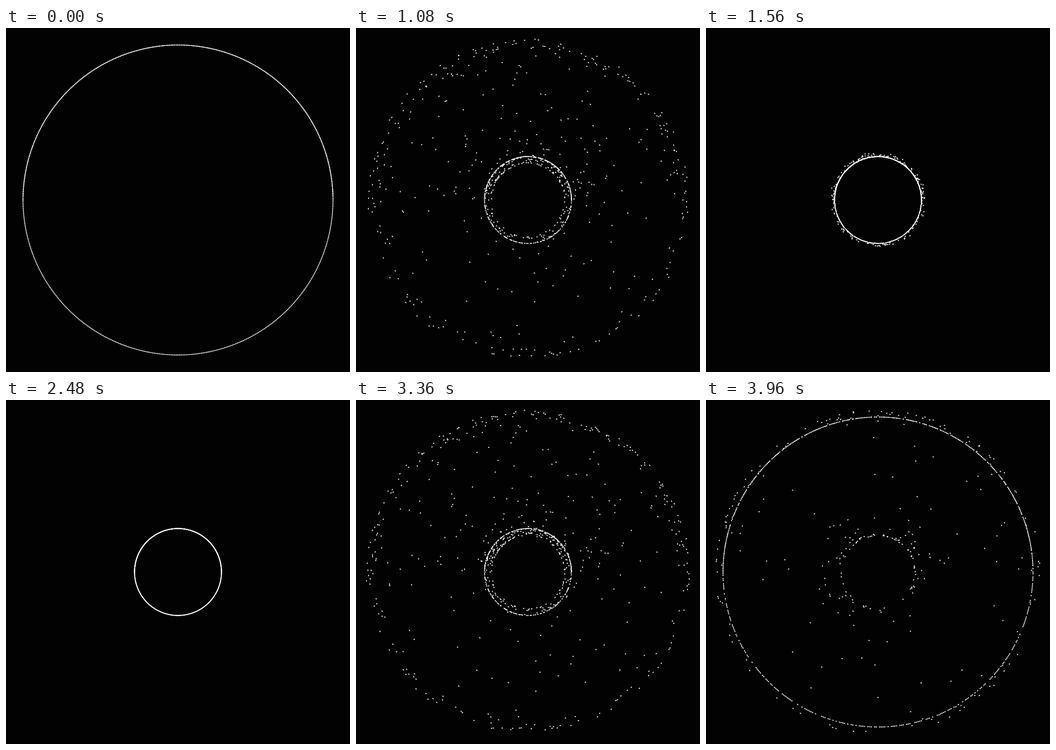
These frames come from a looping animation (748x748 px, 4 s). An HTML page with a canvas:

```html
<!DOCTYPE html>
<html lang="en">
<head>
<meta charset="utf-8">
<title>Dotted ring</title>
<style>
  html, body { margin: 0; height: 100%; overflow: hidden; background: #020202; }
  canvas { display: block; }
</style>
</head>
<body>
<canvas id="stage" width="748" height="748"></canvas>
<script>
const ctx = document.getElementById('stage').getContext('2d');
const CENTER = 374, INNER = 94.5, OUTER = 337;
const LOOP = 4000, STEP = 40, MIDDLE = 2200, SETTLED = 1800;
const SLOTS = 576, COUNT = SLOTS * 1.5;

let seed = 20717;
function random() {
  seed = (seed * 1664525 + 1013904223) % 4294967296;
  return seed / 4294967296;
}

const clamp = x => Math.max(0, Math.min(1, x));

// One and a half laps centred on the bottom, so the upper half holds two dots per slot.
const dots = Array.from({ length: COUNT }, (_, i) => ({
  angle: Math.PI + (i - COUNT / 2) / SLOTS * 2 * Math.PI,
  lead: random() * 2 - 1,
  release: 920 * (1 + 0.1 * random())
}));

// Ease that dips below 0 and rises above 1 before settling.
function backInOut(s) {
  const c = 1.97;
  const pull = x => x * x * ((c + 1) * x - c) / 2;
  return s < 0.5 ? pull(2 * s) : 1 - pull(2 - 2 * s);
}

function radius(dot, age) {
  if (age >= SETTLED) return OUTER;
  const late = clamp((age - 1120) / 640) ** 2;
  const mean = 0.00075 * (age - 707) + 0.72 * late;
  const spread = 0.65 + 0.77 * late;
  const reach = 1 - Math.exp(-Math.pow(age / dot.release, 8.1));
  return INNER + (OUTER - INNER) * reach * backInOut(clamp(mean + spread * dot.lead));
}

function draw(time) {
  // The motion mirrors around the moment the ring is smallest.
  const age = Math.abs(time - MIDDLE);
  ctx.setTransform(1, 0, 0, 1, 0, 0);
  ctx.fillStyle = '#020202';
  ctx.fillRect(0, 0, 748, 748);
  ctx.fillStyle = '#fff';
  for (const dot of dots) {
    const sin = Math.sin(dot.angle), cos = Math.cos(dot.angle);
    const r = radius(dot, age);
    ctx.setTransform(cos, sin, -sin, cos, CENTER + r * sin, CENTER - r * cos);
    ctx.fillRect(-1.4, -0.95, 2.8, 1.9);
  }
}

function tick() {
  const time = performance.now() % LOOP;
  draw(Math.floor(time / STEP) * STEP);
  requestAnimationFrame(tick);
}
tick();
</script>
</body>
</html>
```
